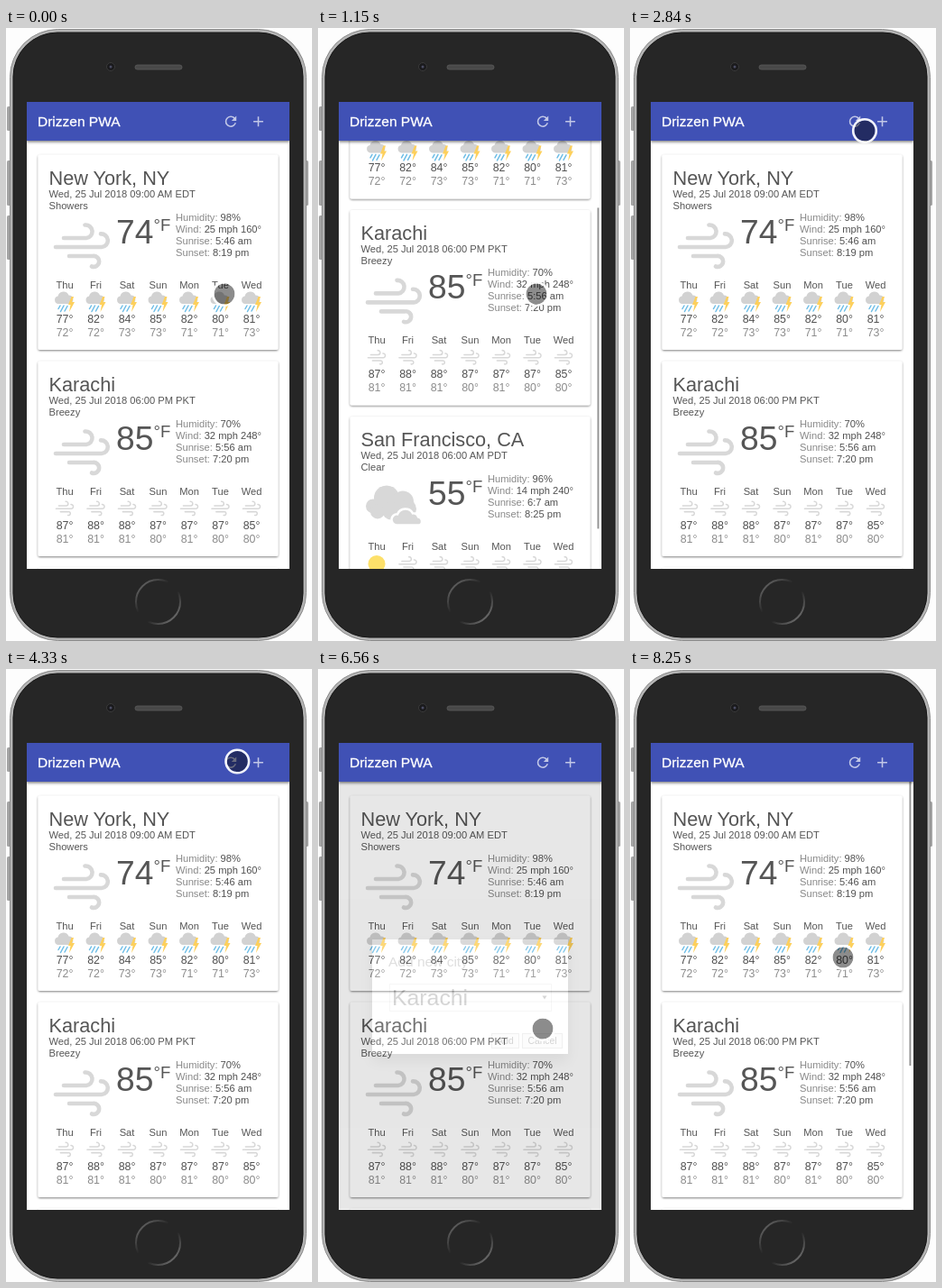
Animation of 339x680 px, one loop 8.33 s. Source, as an HTML page:

```html
<!DOCTYPE html>
<html lang="en">
<head>
<meta charset="utf-8">
<title>Weather app on a phone</title>
<style>
  html, body { margin: 0; height: 100%; overflow: hidden; background: #fdfdfd; }
  svg { display: block; font-family: "Liberation Sans", Arial, sans-serif; }
</style>
</head>
<body>
<svg id="stage" width="339" height="680" viewBox="0 0 339 680"></svg>
<script>
const LOOP = 8330, STEP = LOOP / 108;
const MAX_SCROLL = 228, CARD_PITCH = 229;
const EM = 12.4; // one em of the page at the phone's scale
const SMALL = EM * .9;

const CITIES = [
  { city: "New York, NY", date: "Wed, 25 Jul 2018 09:00 AM EDT", sky: "Showers", temp: 74, big: "wind",
    facts: "Humidity: 98%|Wind: 25 mph 160°|Sunrise: 5:46 am|Sunset: 8:19 pm",
    week: "77/72 82/72 84/73 85/73 82/71 80/71 81/73", icon: () => "storm" },
  { city: "Karachi", date: "Wed, 25 Jul 2018 06:00 PM PKT", sky: "Breezy", temp: 85, big: "wind",
    facts: "Humidity: 70%|Wind: 32 mph 248°|Sunrise: 5:56 am|Sunset: 7:20 pm",
    week: "87/81 88/81 88/81 87/80 87/81 87/80 85/80", icon: () => "breeze" },
  { city: "San Francisco, CA", date: "Wed, 25 Jul 2018 06:00 AM PDT", sky: "Clear", temp: 55, big: "clouds",
    facts: "Humidity: 96%|Wind: 14 mph 240°|Sunrise: 6:7 am|Sunset: 8:25 pm",
    week: "67/56 65/57 65/56 64/55 62/55 61/55 61/55", icon: day => day ? "breeze" : "sun" }
];
const DAYS = "Thu Fri Sat Sun Mon Tue Wed".split(" ");

const text = (x, y, size, fill, str, extra = "") =>
  `<text x="${x}" y="${y}" font-size="${size}" fill="${fill}" ${extra}>${str}</text>`;
const box = (x, y, w, h, fill, extra = "") =>
  `<rect x="${x}" y="${y}" width="${w}" height="${h}" fill="${fill}" ${extra}/>`;
const disc = (x, y, r, fill, extra = "") =>
  `<circle cx="${x}" cy="${y}" r="${r}" fill="${fill}" ${extra}/>`;
const use = (id, x, y) => `<use href="#${id}" x="${x}" y="${y}"/>`;
const shadow = (id, dy, blur, alpha) => `<filter id="${id}" x="-20%" y="-20%" width="140%" height="160%">
  <feDropShadow dx="0" dy="${dy}" stdDeviation="${blur}" flood-opacity="${alpha}"/></filter>`;

const card = (c, i) => {
  const facts = c.facts.split("|").map((fact, n) =>
    text(188, 214 + 13 * n, SMALL, "#888", fact.replace(/: (.*)/, ': <tspan fill="#505050">$1</tspan>')));
  const days = c.week.split(" ").map((pair, n) => {
    const [high, low] = pair.split("/"), x = 65 + 34.5 * n, mid = 'text-anchor="middle"';
    return text(x, 289, SMALL, "#555", DAYS[n], mid) + use(c.icon(n), x, 304) +
      text(x, 327, EM, "#505050", high + "°", mid) + text(x, 342, EM, "#8c8c8c", low + "°", mid);
  });
  return `<g transform="translate(0 ${i * CARD_PITCH})">
    ${box(35.5, 140.5, 266, 216.5, "#fff", 'rx="2" filter="url(#cardShadow)"')}
    ${text(47.5, 173.5, EM * 1.75, "#555", c.city)}
    ${text(47.5, 188, SMALL, "#555", c.date)}
    ${text(47.5, 201, SMALL, "#555", c.sky)}
    ${use(c.big, 84, 242)}
    ${text(122, 238.5, EM * 3, "#555", c.temp)}
    ${text(163.5, 225, EM * 1.5, "#555", "°F")}
    ${facts.join("")}${days.join("")}
  </g>`;
};

const button = (x, w, label) =>
  box(x + .5, 404.5, w, 16, "#eee", 'stroke="#aaa"') +
  text(x + w / 2 + .5, 416, 10.3, "#000", label, 'text-anchor="middle"');

const defs = `<defs>
  ${shadow("cardShadow", 1, 1.1, .5)}${shadow("barShadow", 1.5, 1.5, .5)}${shadow("dialogShadow", 8, 8, .75)}
  <linearGradient id="ring" x1="0" y1="0" x2="1" y2="1">
    <stop offset="0" stop-color="#777"/><stop offset=".4" stop-color="#262626"/>
    <stop offset=".6" stop-color="#262626"/><stop offset="1" stop-color="#888"/></linearGradient>
  <clipPath id="screen">${box(23, 82, 291, 518, "#000")}</clipPath>
  <g id="wind" fill="none" stroke="#d8d8d8" stroke-width="4.6" stroke-linecap="round">
    <path d="M-20-9H5a7 7 0 1 0-1.500-14.500M-29 1H22a7.300 7.300 0 1 0-1-14.600M-14 11H12a6 6 0 1 1-1 11.500"/>
  </g>
  <g id="breeze" transform="scale(.33)">${use("wind", 0, 0)}</g>
  <g id="clouds" fill="#d8d8d8">
    ${disc(-23, -2, 8, "")}${disc(-8, -11, 14, "")}${disc(10, -7, 12, "")}
    ${disc(-18, 4, 8, "")}${disc(-3, 3, 10, "")}${disc(15, 1, 10, "")}
    <path stroke="#fff" stroke-width="2.500" d="M3 19a6 6 0 0 1 1-12a9.500 9.500 0 0 1 17-1a6 6 0 0 1 6 4a5 5 0 0 1 2 9Z"/>
  </g>
  <g id="storm">
    <path fill="#d2d2d2" d="M-7 2a4.300 4.300 0 0 1-.5-8.500a6.300 6.300 0 0 1 12-1a4.800 4.800 0 0 1 1 9.500Z"/>
    <path stroke="#6dbde6" stroke-width="1.500" stroke-linecap="round" d="M-5 4l-2 3.500M-1 4l-3.500 6.500M3 4.500l-3 5.500"/>
    <path fill="#fdd05c" d="M7.500-6L4 3H6.500L5 11L11 0H8L10-6Z"/>
  </g>
  <circle id="sun" r="9.500" fill="#fde06a"/>
</defs>`;

const phone = [[1, 87, 27], [1, 147, 50], [1, 208, 49], [330, 147, 50]]
    .map(([x, y, h]) => box(x, y, 5, h, "#a3a3a3", 'rx="1.500"')).join("") +
  box(4.5, 1.5, 328, 678, "#b4b4b4", 'rx="53" stroke="#8c8c8c"') +
  box(8, 5, 321, 671, "#262626", 'rx="49" stroke="#161616"') +
  disc(116, 43, 4.5, "#1a1a1c", 'stroke="#3a3a3a"') + disc(116, 43, 1.5, "#4b4d63") +
  box(143, 41, 52, 5, "#484848", 'rx="2.500" stroke="#5c5c5c" stroke-width=".8"') +
  disc(168.5, 636.5, 24.5, "none", 'stroke="url(#ring)" stroke-width="2"');

const dialog = `<g id="dialog">
  ${box(23, 82, 291, 517, "rgba(0,0,0,.57)")}
  ${box(60, 300, 217, 127, "#fff", 'filter="url(#dialogShadow)"')}
  ${text(78, 330, EM * 1.25, "#444", "Add new city")}
  ${box(79.5, 349.5, 179, 30, "#fff", 'stroke="#ccc"')}
  ${text(82, 373, EM * 2, "#111", "Karachi")}
  <path d="M248.500 362.500h5l-2.500 4z" fill="#111"/>
  ${button(192, 30, "Add")}${button(226, 44, "Cancel")}
</g>`;

const header = box(23, 82, 291, 43, "#3f51b5", 'filter="url(#barShadow)"') +
  text(35, 109, EM * 1.25, "#fff", "Drizzen PWA", 'stroke="#fff" stroke-width=".3"') +
  `<g fill="#fff" fill-opacity=".68">
    <path id="refresh" transform="translate(239.700 94.400) scale(.776)" d="M17.650 6.350C16.200 4.900 14.210 4 12 4a8 8 0 1 0 7.730 10h-2.080A6 6 0 1 1 16.220 7.780L13 11h7V4z"/>
    <path transform="translate(270.200 94.400) scale(.776)" d="M19 13h-6v6h-2v-6H5v-2h6V5h2v6h6z"/>
  </g>`;

const cursor = `<g id="cursor">
  ${disc(0, 0, 11.5, "#000", 'fill-opacity=".45"')}
  ${disc(0, 0, 12.8, "none", 'stroke="#fff" stroke-opacity=".93" stroke-width="2.600"')}
</g>`;

const el = id => document.getElementById(id);
el("stage").innerHTML = defs + phone + `<g clip-path="url(#screen)">
  ${box(23, 82, 291, 518, "#fff")}
  <g id="list">${CITIES.map(card).join("")}</g>
  ${box(309.5, 84, 1.8, 356, "#8f8f8f", 'id="thumb"')}
  ${dialog}${header}${cursor}
</g>`;

const clamp = v => Math.min(1, Math.max(0, v));
const ease = (t, start, end) => {
  const p = clamp((t - start) / (end - start));
  return p * p * (3 - 2 * p);
};
const fade = (t, start) => 1 - (1 - clamp((t - start) / 333)) ** 2.3;

// Each scroll runs the list to its other end; the thumb lingers, then fades.
const SCROLLS = [[0, 380], [1000, 1465], [6800, 7095], [7712, 7942]];
const scrollAt = t => SCROLLS.reduce((s, [a, b], i) => s + (i % 2 ? -1 : 1) * ease(t, a, b), 0);
const thumbAt = t => Math.max(...SCROLLS.map(([a, b]) => t > a ? 1 - ease(t, b + 300, b + 500) : 0));

// Glides of the pointer: start, end, x, y.
const GLIDES = [
  [1620, 2390, 274, 111], [2490, 2840, 260, 114], [2930, 3090, 247.5, 103], // to refresh
  [4090, 4790, 282.5, 101], [5400, 5940, 256, 413], // to add, then to cancel
  [6330, 6550, 249, 399], [6560, 6860, 236, 320]
];
const pointerAt = t => GLIDES.reduce(([x, y], [a, b, toX, toY]) => {
  const p = ease(t, a, b);
  return [x + (toX - x) * p, y + (toY - y) * p];
}, [242, 295]);

function draw(now) {
  const t = Math.floor((now % LOOP + 16) / STEP) % 108 * STEP;
  const scroll = scrollAt(t);
  el("list").setAttribute("transform", `translate(0 ${-MAX_SCROLL * scroll})`);
  el("thumb").setAttribute("y", 84 + 157 * scroll);
  el("thumb").setAttribute("opacity", thumbAt(t));
  el("dialog").setAttribute("opacity", fade(t, 5090) - fade(t, 6376));
  el("refresh").setAttribute("opacity", t > 3540 && t < 3700 ? .6 : 1);
  el("cursor").setAttribute("transform", `translate(${pointerAt(t)})`);
  requestAnimationFrame(draw);
}
requestAnimationFrame(draw);
</script>
</body>
</html>
```
